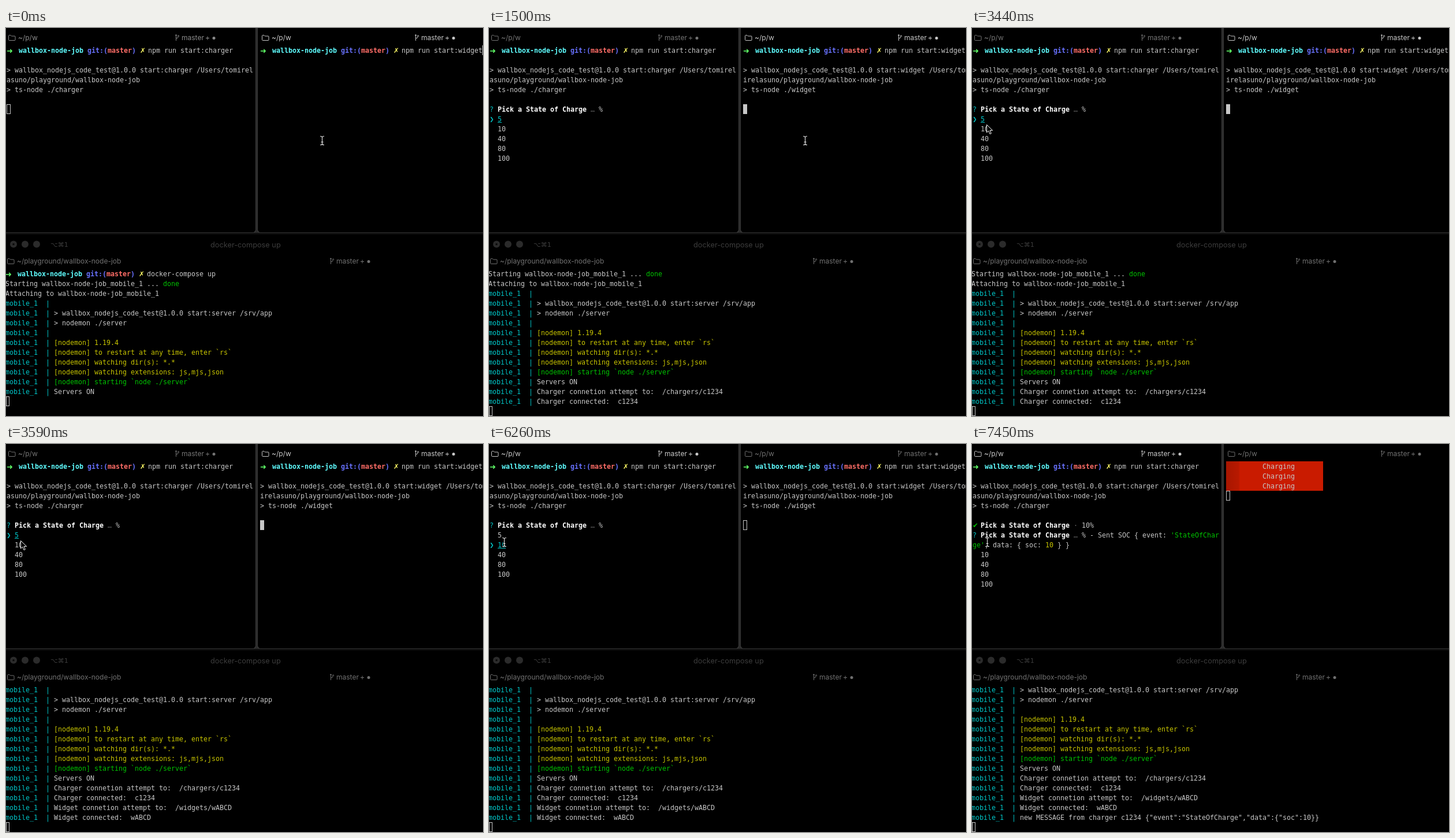
An HTML page that plays this animation: 826x672 px, repeating every 8000 ms.

```html
<!DOCTYPE html>
<html lang="en">
<head>
<meta charset="utf-8">
<title>Terminals</title>
<style>
  html, body { margin: 0; width: 100%; height: 100%; overflow: hidden; background: #000; }
  #stage { position: relative; width: 826px; height: 672px; overflow: hidden; background: #000; }
  #stage > *, .pane > * { position: absolute; }
  svg { left: 0; top: 0; }
  [hidden] { display: none; }

  .pane { font: 11.63px/17px "DejaVu Sans Mono", "Liberation Mono", monospace; color: #c7c7c7; white-space: pre; }
  .pane div div { position: relative; top: 1px; height: 17px; }
  .sym { display: inline-block; width: 7px; height: 17px; vertical-align: top; font-family: "DejaVu Sans", sans-serif; }
  .big { font-size: 13px; }
  .small { font-size: 9px; }
  .bold { font-weight: bold; color: #fff; }
  .dir { font-weight: bold; color: #5ffdff; }
  .git { font-weight: bold; color: #6871ff; }
  .branch { font-weight: bold; color: #ff6d67; }
  .ok { color: #5ff967; }
  .warn { font-weight: bold; color: #fefb67; }
  .cyan { color: #00c5c7; }
  .green { color: #00c200; }
  .yellow { color: #c7c400; }
  .gray { color: #676767; }
  .pick { color: #00c5c7; text-decoration: underline; }

  .cursor { box-sizing: border-box; width: 7px; height: 17px; border: 1px solid #c7c7c7; }
  .full { background: #c7c7c7; }
  .charging { left: 0; top: 0; width: 168px; background: linear-gradient(90deg, #a81600, #b81900 22px, #c91b00 24px); }

  .head { font: 12px Inter, "Liberation Sans", sans-serif; fill: currentColor; stroke: none; }
  .icon { fill: none; stroke: currentColor; }
  .title { font: 12.75px Inter, "Liberation Sans", sans-serif; }
  .keys { font: 11px "DejaVu Sans", sans-serif; }
  #log { left: 0; top: 417px; width: 826px; height: 255px; overflow: hidden; }
  #log .cursor { width: 6px; }
</style>
</head>
<body>
<div id="stage">
  <svg id="chrome" width="826" height="672">
    <path d="M432 0H436V350L440 355H428L432 350Z" fill="#2a2a2a"/>
    <g fill="none" stroke="#3a3a3a">
      <path d="M432.5 0V350Q432.5 354.5 428 354.5H0"/>
      <path d="M435.5 0V350Q435.5 354.5 440 354.5H826"/>
      <path d="M0 356.5H826" stroke="#1c1c1c"/>
    </g>
    <g fill="#2b2b2b">
      <circle cx="13" cy="374.5" r="6"/><circle cx="33" cy="374.5" r="6"/><circle cx="53" cy="374.5" r="6"/>
      <circle cx="13" cy="374.5" r="1.8" fill="#0c0c0c"/>
    </g>
    <g fill="#3c3c3c">
      <text class="keys" x="77" y="379">⌥⌘1</text>
      <text class="title" x="354" y="379.5">docker-compose up</text>
    </g>
  </svg>
  <div class="pane" id="left" style="left:1px;top:30px"></div>
  <div class="pane" id="right" style="left:440px;top:30px"></div>
  <div class="pane" id="log"></div>
  <svg width="826" height="672">
    <defs><path id="bar" d="M-3-7.5Q0-7.5 0-5.5Q0-7.5 3-7.5M0-5.5V5.5M-3 7.5Q0 7.5 0 5.5Q0 7.5 3 7.5M-1.5 2.5H1.5"/></defs>
    <g id="beam" fill="none" stroke-linecap="round">
      <use href="#bar" stroke="#000" stroke-width="2.6"/>
      <use href="#bar" stroke="#eee" stroke-width="1.1"/>
    </g>
    <path id="arrow" d="M.5.5V14L3.6 11.1 6 16.6 8.3 15.6 6 10.3H10.6Z" fill="#000" stroke="#fff"/>
  </svg>
</div>
<script>
  const LOOP = 8000;
  const $ = id => document.getElementById(id);
  const s = (cls, text) => `<span class="${cls}">${text}</span>`;
  const sym = (cls, ch) => s('sym ' + cls, ch);

  // A block of terminal rows, visible from `from` until `to`
  function block(pane, row, lines, from = 0, to = LOOP, cls = '') {
    const rows = lines.map(line => `<div>${line}</div>`).join('');
    $(pane).insertAdjacentHTML('beforeend',
      `<div class="${cls}" style="top:${row * 17}px" data-from="${from}" data-to="${to}">${rows}</div>`);
  }

  function cursor(pane, col, row, from, to, cls = '') {
    block(pane, row, [], from, to, 'cursor ' + cls);
    $(pane).lastElementChild.style.left = col * 7 + 'px';
  }

  function header(id, x, y, path, branchX) {
    $('chrome').insertAdjacentHTML('beforeend', `<g id="${id}" color="#707070">
      <path class="icon" transform="translate(${x} ${y})" d="M.5-7.5Q.5-8.5 1.5-8.5H4L5.5-7H11Q12-7 12-6V-.5Q12 .5 11 .5H1.5Q.5.5.5-.5Z"/>
      <path class="icon" transform="translate(${branchX - 11} ${y})" d="M1.5-9.5V1M1.5-3Q5.5-3 5.5-7M4-6.5L5.5-8.5 7-6.5M0-8L1.5-9.5 3-8"/>
      <text class="head" x="${x + 17}" y="${y}">${path}</text>
      <text class="head" x="${branchX}" y="${y}">master</text>
      <path class="icon" d="M${branchX + 42} ${y - 3.5}h6m-3-3v6"/>
      <circle cx="${branchX + 56}" cy="${y - 3.5}" r="2.5" fill="currentColor"/></g>`);
  }

  const prompt = cmd => sym('ok big', '➜') + '  ' + s('dir', 'wallbox-node-job') + ' ' + s('git', 'git:(') +
    s('branch', 'master') + s('git', ')') + ' ' + sym('warn', '✗') + ' ' + cmd;
  const user = 'tomirelasuno';
  const launch = (name, cut) => [
    `> wallbox_nodejs_code_test@1.0.0 start:${name} /Users/${user.slice(0, cut)}`,
    `${user.slice(cut)}/playground/wallbox-node-job`,
    `> ts-node ./${name}`
  ];

  header('headL', 4, 21, '~/p/w', 304);
  header('headR', 443, 21, '~/p/w', 719);
  header('headB', 2, 408, '~/playground/wallbox-node-job', 572);

  // Charger pane
  const levels = ['5', '10', '40', '80', '100'];
  const question = s('bold', 'Pick a State of Charge');
  const ask = s('cyan', '?') + ' ' + question + ' ' + s('gray', '…') + ' %';
  const menu = chosen => [ask, ...levels.map((v, i) =>
    i === chosen ? sym('cyan small', '❯') + ' ' + s('pick', v) : '  ' + v)];

  block('left', 0, [prompt('npm run start:charger')]);
  block('left', 2, launch('charger', 7));
  cursor('left', 0, 6, 0, 1500);
  block('left', 6, menu(0), 1500, 6260);
  block('left', 6, menu(1), 6260, 7300);
  block('left', 6, [
    sym('green', '✔') + ' ' + question + ' ' + s('gray', '·') + ' 10%',
    ask + ' - Sent SOC { event: ' + s('green', "'StateOfChar"),
    s('green', "ge'") + ', data: { soc: ' + s('yellow', '10') + ' } }',
    ...levels.slice(1).map(v => '  ' + v)
  ], 7300);

  // Widget pane
  block('right', 0, [prompt('npm run start:widget')], 0, 7450);
  block('right', 2, launch('widget', 3), 1350, 7450);
  cursor('right', 55, 0, 0, 600, 'full');
  cursor('right', 0, 1, 600, 1350, 'full');
  cursor('right', 0, 6, 1350, 3740, 'full');
  cursor('right', 0, 6, 3740, 7450);
  block('right', 0, Array(3).fill(' '.repeat(9) + 'Charging'), 7450, LOOP, 'charging');
  cursor('right', 0, 3, 7450, LOOP);

  // Server log
  const mobile = text => s('cyan', 'mobile_1  |') + ' ' + text;
  const nodemon = (cls, text) => mobile(s(cls, '[nodemon] ' + text));
  const log = [
    [0, prompt('docker-compose up')],
    [0, 'Starting wallbox-node-job_mobile_1 ... ' + s('green', 'done')],
    [0, 'Attaching to wallbox-node-job_mobile_1'],
    [0, mobile('')],
    [0, mobile('> wallbox_nodejs_code_test@1.0.0 start:server /srv/app')],
    [0, mobile('> nodemon ./server')],
    [0, mobile('')],
    [0, nodemon('yellow', '1.19.4')],
    [0, nodemon('yellow', 'to restart at any time, enter `rs`')],
    [0, nodemon('yellow', 'watching dir(s): *.*')],
    [0, nodemon('yellow', 'watching extensions: js,mjs,json')],
    [0, nodemon('green', 'starting `node ./server`')],
    [0, mobile('Servers ON')],
    [1500, mobile('Charger connetion attempt to:  /chargers/c1234')],
    [1500, mobile('Charger connected:  c1234')],
    [3590, mobile('Widget connetion attempt to:  /widgets/wABCD')],
    [3590, mobile('Widget connected:  wABCD')],
    [7450, mobile('new MESSAGE from charger c1234 {"event":"StateOfCharge","data":{"soc":10}}')]
  ];
  // The view holds 15 rows; the last one is kept for the cursor
  [0, 1500, 3590, 7450].forEach((from, i, times) => {
    const to = times[i + 1] || LOOP;
    const lines = log.filter(([at]) => at <= from).map(([, line]) => line).slice(-14);
    block('log', 0, lines, from, to);
    $('log').lastElementChild.style.left = '-1px';
    cursor('log', 0, lines.length, from, to);
  });

  // [time, value...] steps: the last one reached applies
  const step = (list, t) => list.filter(([at]) => at <= t).pop();
  const mouse = [
    [0, 'beam', 547.5, 195], [2700, 'beam', 318, 218], [2850, 'beam', 108, 205], [3000, 'beam', 63, 195],
    [3140, 'arrow', 28, 168], [3290, 'arrow', 24, 166], [3440, 'arrow', 25, 167], [3740, 'beam', 26.5, 170]
  ];
  const tints = {
    headL: [[0, '#8a8a8a'], [450, '#747474'], [3740, '#a8a8a8'], [4330, '#c8c8c8']],
    headR: [[0, '#c8c8c8'], [3740, '#8c8c8c'], [5670, '#707070']]
  };
  const timed = [...document.querySelectorAll('[data-from]')];
  const start = performance.now();

  function draw() {
    const t = (performance.now() - start) % LOOP;
    for (const el of timed) el.hidden = t < +el.dataset.from || t >= +el.dataset.to;
    for (const id in tints) $(id).setAttribute('color', step(tints[id], t)[1]);
    const [, shape, x, y] = step(mouse, t);
    for (const id of ['beam', 'arrow']) {
      $(id).setAttribute('visibility', id === shape ? 'visible' : 'hidden');
      $(id).setAttribute('transform', `translate(${x} ${y})`);
    }
    requestAnimationFrame(draw);
  }
  draw();
</script>
</body>
</html>
```
